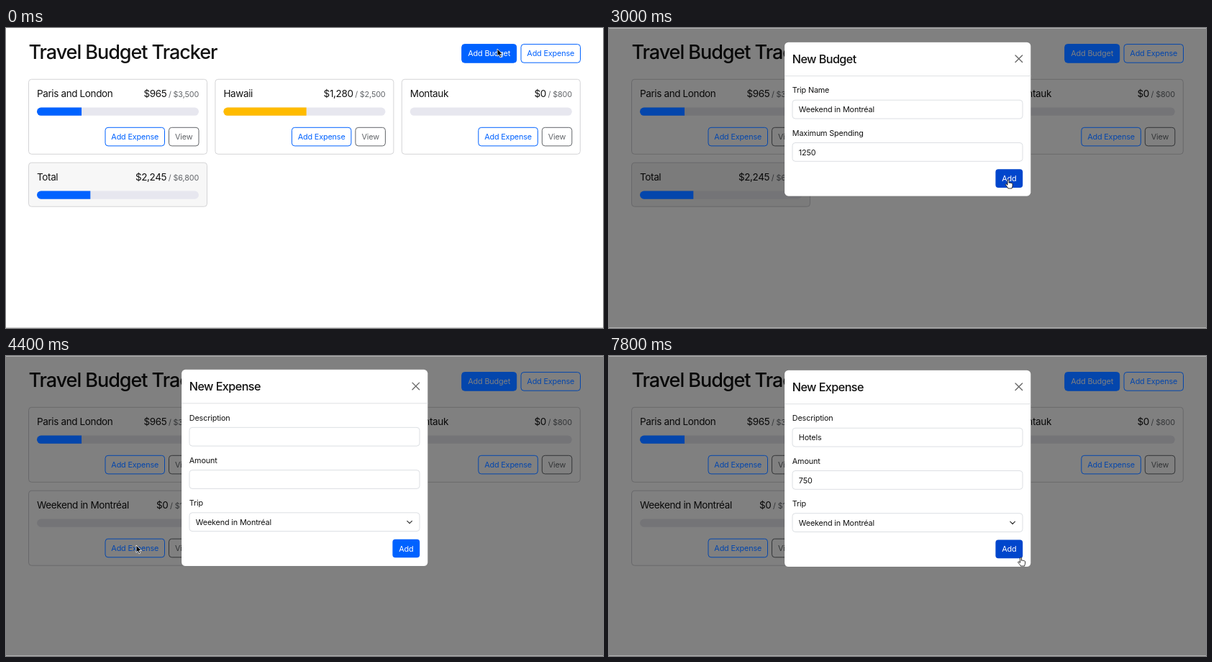
Recreate the animation shown at these times as an HTML page. Size 830 by 417 pixels, loop 8000 ms.

```html
<!DOCTYPE html>
<html lang="en">
<head>
<meta charset="utf-8">
<title>Travel Budget Tracker</title>
<style>
  html, body { margin: 0; width: 100%; height: 100%; overflow: hidden; background: #fff; }
  svg { display: block; width: 100vw; height: 100vh; }
  text { font: 400 10.8px Inter, "Open Sans", sans-serif; letter-spacing: -.013em;
         font-optical-sizing: none; white-space: pre; fill: #111; }
  .page text { fill: var(--ink); }
  .page .h1 { font-size: 27px; font-weight: 500; letter-spacing: -.039em; }
  .h4 { font-size: 16.2px; font-weight: 500; letter-spacing: -.036em; }
  .h5 { font-size: 13.5px; letter-spacing: -.027em; }
  .page .small, .page .grey text { font-size: 10.8px; letter-spacing: -.013em; fill: var(--mute); }
  .mid { text-anchor: middle; }
  .end { text-anchor: end; }
  .card { fill: var(--paper); stroke: var(--line); }
  .total .card { fill: var(--soft); }
  .track { fill: var(--track); }
  .blue { fill: var(--blue); }
  .amber { fill: var(--amber); }
  .btn rect { fill: none; stroke: var(--blue); }
  .page .btn text { fill: var(--blue); }
  .page .grey rect { stroke: var(--mute); }
  .page .grey text { fill: var(--mute); }
  .page .solid rect { fill: var(--blue); }
  .page .solid text { fill: var(--paper); }
  .modal .btn rect { fill: #0062ff; stroke: none; }
  .modal .btn.hover rect { fill: #0046cc; }
  .modal .btn text { fill: #fff; }
  .field { fill: #fff; stroke: #dcdfe3; }
  .focus .field { stroke: #86b2fb; }
  .ring { fill: none; stroke: #0062ff; stroke-opacity: .27; stroke-width: 3; }
  .ring, .spin, .caret { visibility: hidden; }
  .focus .ring, .focus .spin, .focus .caret { visibility: visible; }
  .stroke { fill: none; stroke: #333; stroke-width: 1.2; stroke-linecap: round; stroke-linejoin: round; }
</style>
</head>
<body>
<svg id="stage" viewBox="0 0 830 417" preserveAspectRatio="none"></svg>
<script>
const LOOP = 8000, STEP = 200;
const stage = document.getElementById('stage');
const $ = id => document.getElementById(id);
const clamp = v => Math.max(0, Math.min(1, v));
const within = (t, spans) => spans.some(([a, b]) => t >= a && t < b);

// normal colour and colour behind an open dialog
const palette = {
  paper: [[255, 255, 255], [128, 128, 128]],
  soft: [[247, 247, 247], [123, 123, 123]],
  ink: [[17, 17, 17], [8, 8, 8]],
  mute: [[98, 101, 105], [50, 52, 54]],
  line: [[212, 212, 214], [104, 104, 106]],
  track: [[231, 231, 239], [116, 116, 119]],
  blue: [[0, 98, 255], [4, 70, 172]],
  amber: [[255, 187, 0], [216, 0, 16]],
  edge: [[208, 208, 208], [176, 176, 176]]
};

const text = (x, y, str, cls = '') => `<text x="${x}" y="${y}" class="${cls}">${str}</text>`;
const button = (x, y, w, label, cls = '', id = '') =>
  `<g class="btn ${cls}" id="${id}"><rect x="${x}" y="${y}" width="${w}" height="25.6" rx="4"/>` +
  text(x + w / 2, y + 16.8, label, 'mid') + '</g>';
const barPath = w => w < 6 ? '' : `M${11.5 + w} 39.3v11.2H17.1a5.6 5.6 0 0 1 0-11.2z`;

const slot = i => `translate(${31.5 + i % 3 * 259.4} ${71.3 + Math.floor(i / 3) * 115.9})`;

function card(i, name, spent, max, opt = {}) {
  const { id = '', total = false, tint = 'blue' } = opt;
  const money = n => '$' + n.toLocaleString('en-US');
  return `<g id="${id}" class="${total ? 'total' : ''}" transform="${slot(i)}">
    <rect class="card" width="248" height="${total ? 61 : 104}" rx="4"/>
    ${text(11.5, 24.9, name, 'h5')}
    <text class="h5 end" x="236.6" y="24.9">${money(spent)}<tspan class="small" dx="2.6" id="${id}Max">/ ${money(max)}</tspan></text>
    <rect class="track" x="11.5" y="39.3" width="225" height="11.2" rx="5.6"/>
    <path class="${tint}" id="${id}Bar" d="${barPath(225 * spent / max)}"/>
    ${total ? '' : button(106.5, 67, 82.5, 'Add Expense') + button(195, 67, 41.5, 'View', 'grey')}
  </g>`;
}

function input(id, y, label, kind = 'text') {
  const extra = {
    text: '',
    number: `<g class="spin"><rect x="556" y="${y + 4.5}" width="10.5" height="17" rx="2" fill="#ececec"/>
      <path d="M558.6 ${y + 10.6}h5l-2.5-3zM558.6 ${y + 15.4}h5l-2.5 3z" fill="#222"/></g>`,
    select: `<path class="stroke" d="M557.8 ${y + 11.5}l3.3 3.3 3.3-3.3"/>`
  }[kind];
  return `${text(254.8, y - 9.8, label)}<g id="${id}">
    <rect class="ring" x="253.2" y="${y - 1.6}" width="323.6" height="29" rx="5.5"/>
    <rect class="field" x="255" y="${y}" width="320" height="25.8" rx="4"/>${extra}
    <text x="263.8" y="${y + 17}"></text>
    <rect class="caret" y="${y + 6.5}" width="1" height="12.5" fill="#111"/></g>`;
}

const modal = (id, title, bottom, fields) => `<g class="modal" id="${id}">
  <rect x="244" y="19.7" width="342.4" height="${bottom - 19.7}" rx="5.4" fill="#fff" stroke="#000" stroke-opacity=".15" stroke-width=".7"/>
  <path d="M244 66.7H586.4" stroke="#dee0e3"/>
  ${text(254.8, 49.2, title, 'h4')}
  <path class="stroke" style="stroke:#6a6a6a;stroke-width:1.4" d="M565 38l9.6 9.6M574.6 38l-9.6 9.6"/>
  ${fields}${button(537.4, bottom - 37.4, 37.8, 'Add', '', id + 'Add')}</g>`;

stage.innerHTML = `
  <g class="page">
    <rect width="830" height="417" fill="var(--paper)"/>
    <path d="M0 416.5H830" stroke="var(--edge)"/>
    <path id="topEdge" d="M0 .5H830" stroke="var(--edge)"/>
    ${text(31.5, 43, 'Travel Budget Tracker', 'h1')}
    ${button(633.7, 22.6, 76, 'Add Budget', 'solid')}
    ${button(716, 22.6, 82.5, 'Add Expense')}
    ${card(0, 'Paris and London', 965, 3500)}
    ${card(1, 'Hawaii', 1280, 2500, { tint: 'amber' })}
    ${card(2, 'Montauk', 0, 800)}
    ${card(3, 'Weekend in Montréal', 0, 1250, { id: 'weekend' })}
    ${card(3, 'Total', 2245, 6800, { id: 'total', total: true })}
  </g>
  ${modal('budget', 'New Budget', 233.7,
    input('trip', 100.2, 'Trip Name') + input('max', 159.5, 'Maximum Spending', 'number'))}
  ${modal('expense', 'New Expense', 293,
    input('desc', 100.2, 'Description') + input('amount', 159.5, 'Amount', 'number') +
    input('pick', 218.7, 'Trip', 'select'))}
  <g id="cursor" stroke="#fff" stroke-width=".8" stroke-linejoin="round">
    <path id="arrow" fill="#000" d="M0 0v10.2l2.3-2.1 1.6 3.7 1.8-.8-1.6-3.5h3.2z"/>
    <path id="hand" fill="#fff" stroke="#000" d="M-1 1c0-1.5 2-1.5 2 0v3.4c.4-.8 1.8-.6 1.9.2.5-.6 1.7-.4 1.8.4.6-.4 1.4 0 1.4.8v2.4c0 1.6-.9 2-.9 3.8h-5.4c-.5-1.8-2.4-3.2-3.5-5-.5-1 .7-1.6 1.4-.9l1.3 1.2z"/>
  </g>`;

const OPEN1 = 340, CLOSE1 = 3132, OPEN2 = 4130;
const ease = p => 1 - Math.pow(1 - clamp(p), 1.6);
const typed = (str, t, from, to) => str.slice(0, Math.round(str.length * clamp((t - from) / (to - from))));

function showModal(id, t, open, close) {
  const alpha = clamp((t - open) / 150) * (1 - clamp((t - close) / 150));
  const lift = 1 - ease((t - open) / 300) + ease((t - close) / 300);
  $(id).setAttribute('opacity', alpha);
  $(id).setAttribute('transform', `translate(0 ${-35 * lift})`);
  return alpha;
}

function setInput(id, value, focused) {
  const g = $(id), label = g.querySelector('text');
  label.textContent = value;
  g.setAttribute('class', focused ? 'focus' : '');
  g.querySelector('.caret').setAttribute('x', 264 + (value ? label.getComputedTextLength() : 0));
}

const route = [
  [0, 683, 29], [700, 683, 29], [2500, 610, 260], [2900, 555, 211], [3300, 555, 211],
  [3900, 181, 263], [4500, 181, 263], [4950, 330, 113], [7100, 330, 113], [7600, 572.5, 280]
];

function pointer(t) {
  const i = route.findIndex(k => k[0] > t);
  if (i < 0) return route[route.length - 1].slice(1);
  const [t0, x0, y0] = route[i - 1], [t1, x1, y1] = route[i];
  const p = (t - t0) / (t1 - t0), s = p * p * (3 - 2 * p);
  return [x0 + (x1 - x0) * s, y0 + (y1 - y0) * s];
}

function draw(t) {
  const dim = showModal('budget', t, OPEN1, CLOSE1) + showModal('expense', t, OPEN2, Infinity);
  for (const [name, [from, to]] of Object.entries(palette)) {
    const rgb = from.map((c, i) => Math.round(c + (to[i] - c) * dim));
    stage.style.setProperty('--' + name, `rgb(${rgb})`);
  }
  $('topEdge').setAttribute('opacity', dim);

  const added = t >= CLOSE1;
  const share = 1 / 6800 + (1 / 8050 - 1 / 6800) * ease((t - 3200) / 200);
  $('weekend').style.display = added ? '' : 'none';
  $('total').setAttribute('transform', slot(added ? 4 : 3));
  $('totalMax').textContent = added ? '/ $8,050' : '/ $6,800';
  $('totalBar').setAttribute('d', barPath(225 * 2245 * share));

  setInput('trip', typed('Weekend in Montréal', t, 600, 1400), t >= 500 && t < 1500);
  setInput('max', typed('1250', t, 1600, 2400), t >= 1500 && t < 3000);
  setInput('desc', typed('Hotels', t, 5000, 6000), t >= 4950 && t < 6300);
  setInput('amount', typed('750', t, 6400, 7000), t >= 6300 && t < 7700);
  setInput('pick', 'Weekend in Montréal', false);
  $('budgetAdd').classList.toggle('hover', t >= 2900);
  $('expenseAdd').classList.toggle('hover', t >= 7500);

  const hand = within(t, [[200, OPEN1], [2900, CLOSE1], [3900, OPEN2], [7500, LOOP]]);
  const seen = within(t, [[0, 700], [2500, 3300], [3500, 5200], [7100, LOOP]]);
  $('cursor').style.display = seen ? '' : 'none';
  $('cursor').setAttribute('transform', `translate(${pointer(t)})`);
  $('arrow').style.display = hand ? 'none' : '';
  $('hand').style.display = hand ? '' : 'none';
}

const start = performance.now();
function tick() {
  const t = (performance.now() - start) % LOOP;
  draw(Math.floor(t / STEP) * STEP);
  requestAnimationFrame(tick);
}
tick();
</script>
</body>
</html>
```
